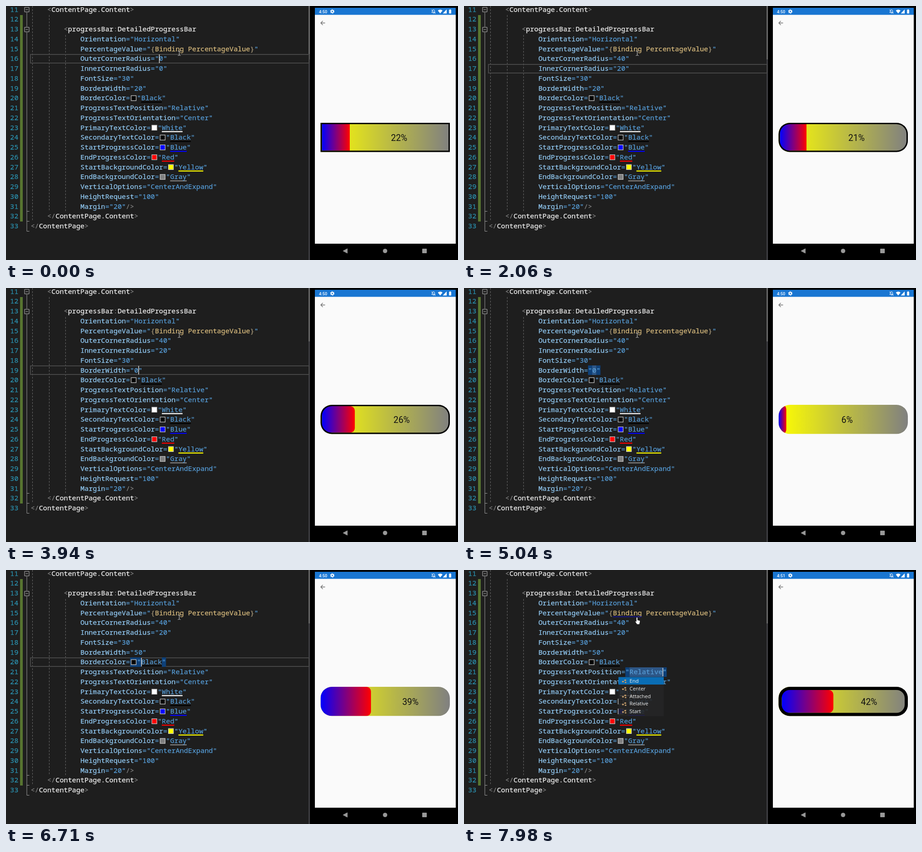
These frames come from a looping animation (998 by 561 pixels, 8 s). An HTML page:

```html
<!DOCTYPE html>
<html lang="en">
<head>
<meta charset="utf-8">
<title>Progress bar styling</title>
<style>
  html, body { margin: 0; width: 100%; height: 100%; overflow: hidden; background: #000; }
  svg { display: block; }
  .code { font: 15.24px "Noto Sans Mono", "DejaVu Sans Mono", monospace; white-space: pre; }
  .code text { stroke-width: .25; }
  .ui { font: 11.3px "Open Sans", "Noto Sans", sans-serif; }
  .phone { font-family: Roboto, Arial, sans-serif; }
</style>
</head>
<body>
<svg id="stage" width="998" height="561" viewBox="0 0 998 561">
  <defs>
    <linearGradient id="fill"><stop stop-color="#00f"/><stop offset="1" stop-color="#f00"/></linearGradient>
    <linearGradient id="back"><stop stop-color="#ff0"/><stop offset="1" stop-color="#808080"/></linearGradient>
    <clipPath id="shape"><rect id="shapeBox" x="694.5" y="258" width="285.5" height="64.5"/></clipPath>
  </defs>
  <rect width="671" height="561" fill="#1e1e1e"/>
  <rect x="668" width="3" height="561" fill="#3e3e42"/>
  <rect x="668" width="3" height="118" fill="#686868"/>
  <g id="gutter"></g>
  <g id="marks"></g>
  <g id="code" class="code"></g>
  <rect id="link" x="328.5" y="102.5" width="64" height="1.6" fill="#1414a0"/>
  <rect id="caret" width="1.4" height="19" fill="#e8e8e8"/>
  <g id="popup" class="ui"></g>
  <path id="beam" d="M379.5 99.5q3 0 3 1.5v7q0 1.5-3 1.5M385.5 99.5q-3 0-3 1.5M385.5 109.5q-3 0-3-1.5" fill="none" stroke="#d0d0d0"/>
  <path id="hand" d="M380.5 105.5q1.5-2 2.7 0v5l4.6 1.2q1.2.6.8 2.3l-1.3 6h-5.3l-4-6q.3-1.8 2.5-.4z" fill="#fff" stroke="#111" stroke-width=".6"/>
  <g id="device" class="phone">
    <rect x="682" y="4" width="311" height="521" fill="#fafafa"/>
    <rect x="682" y="4" width="311" height="15.5" fill="#1976d2"/>
    <text id="clock" x="691" y="15.5" font-size="9.3" font-weight="500" fill="#fff"></text>
    <circle cx="720.5" cy="12" r="2.6" fill="none" stroke="#fff" stroke-width="2"/>
    <circle cx="720.5" cy="12" r="4.1" fill="none" stroke="#fff" stroke-width="1.2" stroke-dasharray="2.15"/>
    <path d="M940 14.5h7.5l-1-1.5v-2.5q-.5-2.3-2.7-2.3t-2.7 2.3v2.5zM943 16h1.8" fill="none" stroke="#fff"/>
    <path d="M939.5 8l8.5 9" stroke="#fff"/>
    <path d="M953.5 10q5.2-3.8 10.4 0l-5.2 6.5zM973 7.5v9h-8.5zM978.3 8.5h1.2v-1h2.3v1h1.2v8h-4.7z" fill="#fff"/>
    <path d="M704.5 37.5h-9M699.5 33l-4.5 4.5 4.5 4.5" fill="none" stroke="#6e6e6e" stroke-width="1.3"/>
    <path d="M753.7 536v10l-9.4-5zM919.5 536.5h9v9h-9z" fill="#999" stroke="#999" stroke-linejoin="round"/>
    <circle cx="837" cy="541" r="4.8" fill="#999"/>
    <g id="bar">
      <g clip-path="url(#shape)">
        <rect x="694.5" y="258" width="285.5" height="64.5" fill="url(#back)"/>
        <rect id="progress" fill="url(#fill)"/>
        <rect id="border" x="694.5" y="258" width="285.5" height="64.5" fill="none" stroke="#000"/>
      </g>
      <text id="percent" y="297.6" font-size="19.4" text-anchor="middle" fill="#111"></text>
    </g>
  </g>
</svg>
<script>
const $ = id => document.getElementById(id);
const LOOP = 8000, CHAR = 9.144, LEFT = 54.4, ATTR = LEFT + 12 * CHAR, SWATCH = 15.4;
const mid = n => 7.5 + (n - 11) * 21.75;

function set(node, attrs) {
  for (const k in attrs) node.setAttribute(k, attrs[k]);
  return node;
}
function add(parent, tag, attrs, text) {
  const node = set(document.createElementNS("http://www.w3.org/2000/svg", tag), attrs);
  if (text !== undefined) node.textContent = text;
  parent.appendChild(node);
  return node;
}
const rect = (parent, x, y, width, height, fill) => add(parent, "rect", { x, y, width, height, fill });

// Line numbers, change margin, outlining and indent guides
const gutter = $("gutter"), code = $("code"), marks = $("marks");
const margin = rect(gutter, 31, 20, 6, 456, "#577430");
const line = (d, extra) => add(gutter, "path", { d, fill: "none", stroke: "#a0a0a0", ...extra });
line("M46 14V46M46 58V497.5H51.5M46 453.5h5.5M46 475.5h5.5");
for (const y of [8, 52]) line(`M41 ${y - 5}h10v10h-10zM43.5 ${y}h5`, { stroke: "#bbb" });
line("M58.5 0V476M95.5 20V453M131.5 64V453", { stroke: "#6a6a6a", "stroke-dasharray": "4 3" });

// Code text
const GREY = "#808080", NAME = "#f0f0f0", PROP = "#92caf4", VALUE = "#569cd6", TAN = "#d7ba7d";
function write(n, x, parts) {
  const node = add(code, "text", { x, y: mid(n) + 5 });
  for (const [text, fill] of parts) add(node, "tspan", { fill, stroke: fill }, text);
  return node;
}
for (let n = 11; n <= 33; n++) write(n, 9, [[n, "#2b91af"]]);

const tag = (n, col, open, name) => write(n, LEFT + col * CHAR, [[open, GREY], [name, NAME], [">", GREY]]);
tag(11, 4, "<", "ContentPage.Content");
write(13, LEFT + 8 * CHAR, [["<", GREY], ["progressBar", NAME], [":", GREY], ["DetailedProgressBar", NAME]]);
tag(32, 4, "</", "ContentPage.Content");
tag(33, 0, "</", "ContentPage");

const rows = {};
const props = `Orientation=Horizontal PercentageValue= OuterCornerRadius=0 InnerCornerRadius=0 FontSize=30
  BorderWidth=20 BorderColor=Black# ProgressTextPosition=Relative ProgressTextOrientation=Center
  PrimaryTextColor=White# SecondaryTextColor=Black# StartProgressColor=Blue# EndProgressColor=Red#
  StartBackgroundColor=Yellow# EndBackgroundColor=Gray# VerticalOptions=CenterAndExpand
  HeightRequest=100 Margin=20`.split(/\s+/);
props.forEach((prop, i) => {
  const n = 14 + i, [name, raw] = prop.split("="), value = raw.replace("#", "");
  const start = ATTR + (name.length + 1) * CHAR;
  const colored = raw.endsWith("#"), x = start + (colored ? SWATCH : 0);
  write(n, ATTR, [[name, PROP], ["=", VALUE]]);
  if (colored) {
    set(rect(code, start + 2.5, mid(n) - 5.2, 11, 11, value), { stroke: "#c8c8c8", "stroke-width": 1.3 });
    rect(code, x + CHAR, mid(n) + 7.8, value.length * CHAR, 2.3, value);
  }
  const parts = value ? [['"' + value + '"', VALUE]]
    : [['"', VALUE], ["{", "#a8987a"], ["Binding PercentageValue", TAN], ["}", "#a8987a"], ['"', VALUE]];
  if (n === 31) parts.push(["/>", GREY]);
  rows[n] = { start, x, value, text: write(n, x, parts).firstChild };
});

// Active line frame, matched quotes and selection
const frame = add(marks, "rect", { x: 54, width: 615, height: 19, fill: "none", stroke: "#464646", "stroke-width": 2 });
const quoteA = rect(marks, 0, 0, 0, 21, "#0e4078");
const quoteB = rect(marks, 0, 0, CHAR, 21, "#0e4078");
const picked = rect(marks, 0, 0, 0, 21, "#2d5686");

// Completion list
const popup = $("popup");
set(rect(popup, 341, 236, 100, 87, "#252526"), { opacity: .87 });
rect(popup, 341, 236.5, 100, 16.5, "#0a6db5");
["End", "Center", "Attached", "Relative", "Start"].forEach((word, i) => {
  const y = 245 + i * 16.8;
  add(popup, "path", { d: `M349 ${y}h4v3h-4zM354 ${y - 3}h4v3h-4zM355 ${y + 2}h3.5v2.5h-3.5z`, fill: "#c09a6a" });
  add(popup, "text", { x: 365.5, y: y + 4, fill: "#f1f1f1" }, word);
});

// Editing steps: each one changes part of the editor state.
// at = caret position in the value, quotes/pick/dirty are flags, blink = start of the caret phase
const steps = [
  [0, { n: 16, at: 0, outer: "0", inner: "0", width: "20", blink: 0 }],
  [150, { at: 1, outer: "40", dirty: 1 }],
  [300, { dirty: 0 }],
  [400, { n: 17, at: 0, quotes: 1 }],
  [1760, { at: 1, inner: "20", quotes: 0, dirty: 1, blink: 1500 }],
  [1960, { dirty: 0, blink: 1500 }],
  [2360, { n: 18 }],
  [2620, { n: 19, at: 0, quotes: 1, blink: 2400 }],
  [3500, { quotes: 0, at: 0, width: "0", dirty: 1 }],
  [3690, { at: 1, dirty: 0 }],
  [4880, { at: -1, quotes: 1, pick: 1 }],
  [5290, { at: 1, width: "5", quotes: 0, pick: 0, dirty: 1 }],
  [5400, { at: 2, width: "50" }],
  [5560, { dirty: 0 }],
  [5650, { n: 20, at: 0, quotes: 1 }],
  [6900, { n: 21, quotes: 0 }],
  [7200, { quotes: 1 }],
  [7620, { at: 8, pick: 1, ctrl: 1 }],
  [7860, { list: 1 }]
];
function editorAt(t) {
  const state = {};
  for (const [time, change] of steps) {
    if (time > t) break;
    Object.assign(state, { blink: time }, change);
  }
  return state;
}

// Each reload shows a new bar; keys are [time, percent]
const bars = [
  { from: -500, to: 1190, outer: 0, inner: 0, width: 3, keys: [[0, 22.2], [940, 43.3], [1190, 47]] },
  { from: 1190, to: 3060, outer: 25, inner: 0, width: 3, keys: [[1140, 0], [2060, 21.3], [2480, 30.5], [2940, 42.3]] },
  { from: 3060, to: 4790, outer: 25, inner: 10, width: 3, keys: [[2990, 0], [4120, 31.5], [4250, 35.2], [4410, 35.2], [4700, 41]] },
  { from: 4790, to: 6930, outer: 25, inner: 10, width: 0,
    keys: [[4790, 0], [5040, 6.2], [6040, 31.2], [6210, 33.5], [6460, 33.5], [6550, 37.2], [6709, 37.2], [6710, 39.2], [6900, 41]] },
  { from: 6930, to: 9000, outer: 25, inner: 10, width: 7, keys: [[6880, 0], [7980, 42.3]] }
];
function follow(keys, t) {
  const i = keys.findIndex(k => k[0] > t);
  if (i < 0) return keys[keys.length - 1][1];
  if (i === 0) return keys[0][1];
  const [t0, a] = keys[i - 1], [t1, b] = keys[i];
  return a + (b - a) * (t - t0) / (t1 - t0);
}
const show = (node, on) => set(node, { visibility: on ? "visible" : "hidden" });

function drawEditor(t) {
  const s = editorAt(t), row = rows[s.n], top = Math.floor(mid(s.n) - 10);
  rows[16].value = s.outer;
  rows[17].value = s.inner;
  rows[19].value = s.width;
  for (const n of [16, 17, 19]) rows[n].text.textContent = '"' + rows[n].value + '"';
  const first = row.x + CHAR, size = row.value.length * CHAR;
  set(margin, { fill: s.dirty ? "#eff284" : "#577430" });
  show(set(frame, { y: top + 1 }), !s.pick);
  show(set(quoteA, { x: row.start, y: top, width: first - row.start }), s.quotes);
  show(set(quoteB, { x: first + size, y: top }), s.quotes);
  show(set(picked, { x: first, y: top, width: size }), s.pick);
  const lit = Math.floor((t - s.blink) / 530) % 2 === 0;
  show(set($("caret"), { x: first + s.at * CHAR, y: top + 1 }), lit && s.at >= 0);
  show($("link"), s.ctrl);
  show($("hand"), s.ctrl);
  show($("beam"), !s.ctrl);
  show(popup, s.list);
}

function drawBar(t) {
  const b = bars.find(b => t < b.to), p = Math.floor(follow(b.keys, t));
  const x = 694.5 + b.width, span = 285.5 - 2 * b.width, done = span * p / 100;
  set($("shapeBox"), { rx: b.outer });
  set($("progress"), { x, y: 258 + b.width, width: done, height: 64.5 - 2 * b.width, rx: b.inner });
  set($("border"), { rx: b.outer, "stroke-width": 2 * b.width });
  set($("percent"), { x: x + (done + span) / 2 }).textContent = p + "%";
  const fadeIn = (t - b.from) / 150, fadeOut = (b.to - 110 - t) / 80;
  set($("bar"), { opacity: Math.min(1, Math.max(.05, Math.min(fadeIn, fadeOut))) });
  $("clock").textContent = t < 7000 ? "4:50" : "4:51";
}

function tick() {
  const t = performance.now() % LOOP;
  drawEditor(t);
  drawBar(t);
  requestAnimationFrame(tick);
}
tick();
</script>
</body>
</html>
```
